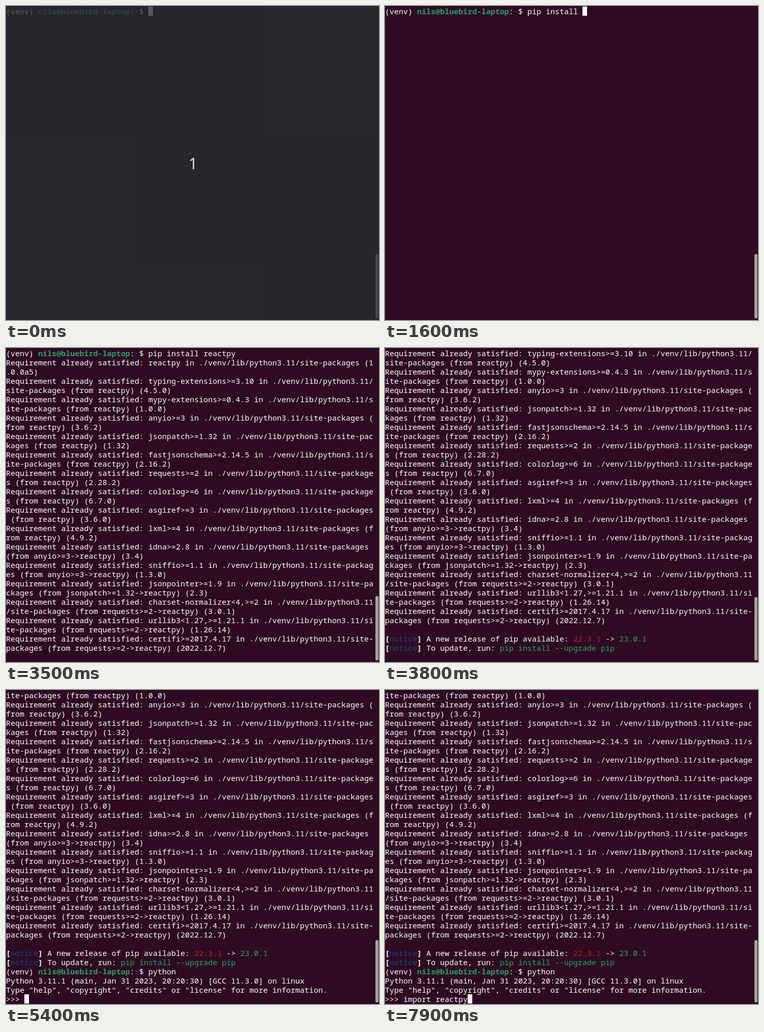
Recreate the animation shown at these times as an HTML page. Size 731 by 614 pixels, loop 8 s.

```html
<!DOCTYPE html>
<html lang="en">
<head>
<meta charset="utf-8">
<title>Terminal session</title>
<style>
  html, body { margin: 0; width: 100%; height: 100%; overflow: hidden; background: #2e0b22; }
  #stage { position: absolute; left: 0; top: 0; width: 731px; height: 614px; overflow: hidden; background: #2e0b22; }
  #screen {
    position: absolute; left: 0; top: 1px; margin: 0; color: #fff;
    font: 15px/18px "Noto Sans Mono", "DejaVu Sans Mono", monospace;
    font-variant-ligatures: none; font-kerning: none;
  }
  #cursor { position: absolute; width: 9px; height: 18px; background: #fff; }
  #thumb { position: absolute; left: 724px; width: 6px; bottom: 3px; border-radius: 3px; background: #a8a4a1; }
  #countdown { position: absolute; inset: 0; background: rgba(40, 46, 49, .78); }
  #countdown text { font: 30px "Noto Sans", "Open Sans", sans-serif; fill: #dcdfe2; }
  b { font-weight: 700; }
  .green { color: #26a269; }
  .blue { color: #12488b; }
  .red { color: #c01c28; }
</style>
</head>
<body>
<div id="stage">
  <pre id="screen"></pre>
  <div id="cursor"></div>
  <div id="thumb"></div>
  <svg id="countdown" width="731" height="614"><rect width="0" height="0"/><text x="366.5" y="318.5" text-anchor="middle">1</text></svg>
</div>
<script>
const LOOP = 8000, COLS = 80, ROWS = 34, CELL_W = 9, CELL_H = 18;
const [screenEl, cursorEl, thumbEl, countEl] =
  ['screen', 'cursor', 'thumb', 'countdown'].map(id => document.getElementById(id));

const esc = s => s.replace(/&/g, '&amp;').replace(/</g, '&lt;').replace(/>/g, '&gt;');
const paint = (color, s) => `<span class="${color}">${esc(s)}</span>`;
const wrap = s => s.match(new RegExp(`.{1,${COLS}}`, 'g')).map(esc);

const PROMPT = `(venv) <b class="green">nils@bluebird-laptop</b>:<b class="blue">~</b>$ `;
const PROMPT_COLS = 31;
const NOTICE = `<b>[</b>${paint('blue', 'notice')}<b>]</b> `;

// package, required by, installed version
const packages = [
  ['reactpy', '', '1.0.0a5'],
  ['typing-extensions>=3.10', 'reactpy', '4.5.0'],
  ['mypy-extensions>=0.4.3', 'reactpy', '1.0.0'],
  ['anyio>=3', 'reactpy', '3.6.2'],
  ['jsonpatch>=1.32', 'reactpy', '1.32'],
  ['fastjsonschema>=2.14.5', 'reactpy', '2.16.2'],
  ['requests>=2', 'reactpy', '2.28.2'],
  ['colorlog>=6', 'reactpy', '6.7.0'],
  ['asgiref>=3', 'reactpy', '3.6.0'],
  ['lxml>=4', 'reactpy', '4.9.2'],
  ['idna>=2.8', 'anyio>=3->reactpy', '3.4'],
  ['sniffio>=1.1', 'anyio>=3->reactpy', '1.3.0'],
  ['jsonpointer>=1.9', 'jsonpatch>=1.32->reactpy', '2.3'],
  ['charset-normalizer<4,>=2', 'requests>=2->reactpy', '3.0.1'],
  ['urllib3<1.27,>=1.21.1', 'requests>=2->reactpy', '1.26.14'],
  ['certifi>=2017.4.17', 'requests>=2->reactpy', '2022.12.7'],
];
const pipOutput = packages.flatMap(([name, parent, version]) => wrap(
  `Requirement already satisfied: ${name} in ./venv/lib/python3.11/site-packages ` +
  (parent && `(from ${parent}) `) + `(${version})`));

const notices = [
  '',
  `${NOTICE}A new release of pip available: ${paint('red', '22.3.1')} -&gt; ${paint('green', '23.0.1')}`,
  `${NOTICE}To update, run: ${paint('green', 'pip install --upgrade pip')}`,
];
const banner = [
  'Python 3.11.1 (main, Jan 31 2023, 20:20:30) [GCC 11.3.0] on linux',
  'Type "help", "copyright", "credits" or "license" for more information.',
];

// One keystroke time per character, in tenths of a second
const typed = (text, keys) => t => text.slice(0, keys.filter(k => t >= k * 100).length);
const install = typed('pip install reactpy',
  [5, 6, 7, 8, 10, 11, 11, 12, 13, 13, 15, 16, 20, 21, 22, 22, 24, 26, 27]);
const launch = typed('python', [45, 47, 48, 49, 50, 51]);
const importing = typed('import reactpy',
  [60, 61, 63, 63, 65, 66, 70, 71, 72, 73, 74, 75, 78, 79]);

// Returns the transcript so far and the cursor column, or -1 while it is hidden
function session(t) {
  const lines = [PROMPT + install(t)];
  if (t < 2800) return [lines, PROMPT_COLS + install(t).length];
  if (t < 3400) return [[...lines, ''], 0];

  lines.push(...pipOutput.slice(0, t < 3500 ? 18 : pipOutput.length));
  if (t < 3800) return [lines, -1];

  lines.push(...notices);
  if (t < 4000) return [[...lines, ''], -1];

  lines.push(PROMPT + launch(t));
  if (t < 5400) return [lines, PROMPT_COLS + launch(t).length];

  lines.push(...banner, '&gt;&gt;&gt; ' + importing(t));
  return [lines, 4 + importing(t).length];
}

let shown = null;
function render(t) {
  const [lines, col] = session(t);
  const html = lines.slice(-ROWS).join('\n');
  if (html !== shown) screenEl.innerHTML = shown = html;

  const row = Math.min(lines.length, ROWS) - 1;
  cursorEl.style.display = col < 0 ? 'none' : 'block';
  cursorEl.style.left = col * CELL_W + 'px';
  cursorEl.style.top = 1 + row * CELL_H + 'px';

  const scrolled = Math.max(0, lines.length - ROWS);
  thumbEl.style.top = 485 + scrolled * 2 / 3 + 'px';
  countEl.style.display = t < 100 ? 'block' : 'none';
}

const start = performance.now();
function tick() {
  render((performance.now() - start) % LOOP);
  requestAnimationFrame(tick);
}
tick();
</script>
</body>
</html>
```
